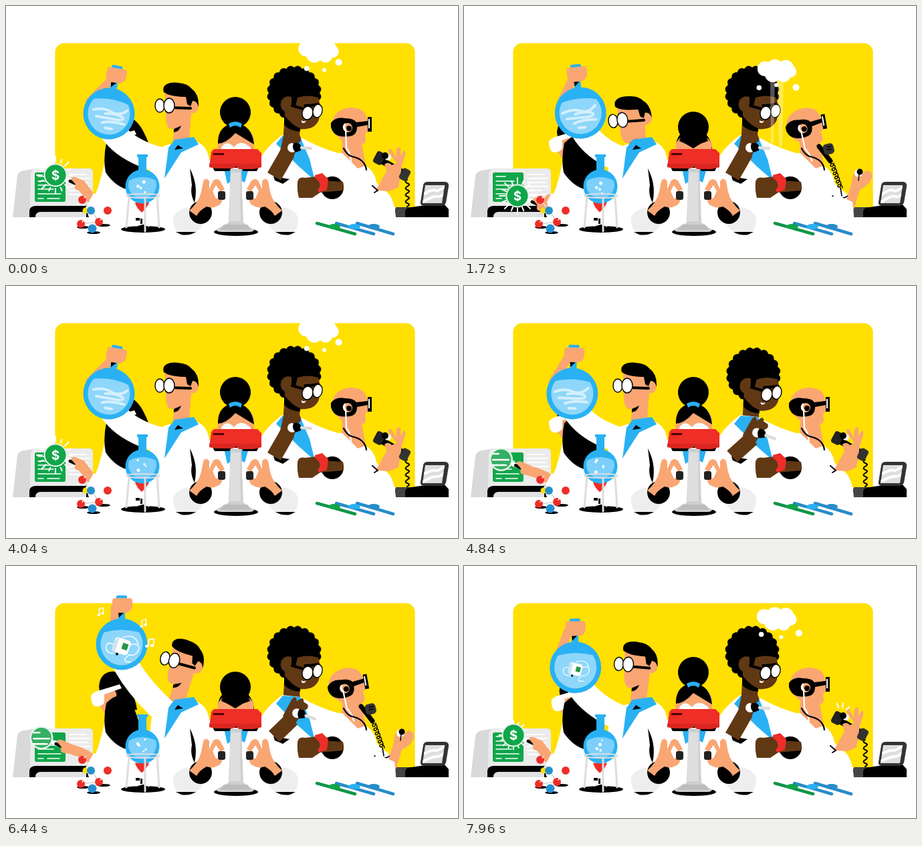
Recreate the animation shown at these times as an HTML page. Size 676 by 377 pixels, loop 8 s.

```html
<!DOCTYPE html>
<html lang="en">
<head>
<meta charset="utf-8">
<title>Laboratory</title>
<style>
  html, body { margin: 0; width: 100%; height: 100%; overflow: hidden; background: #fff; }
  svg { display: block; width: 676px; height: 377px; }
  .skin { fill: #f9a673; } .brown { fill: #613814; } .white { fill: #fff; }
  .blue { fill: #29b1f3; } .red { fill: #ee2e27; } .green { fill: #10a64a; }
  .line { fill: none; stroke: #000; stroke-linecap: round; stroke-linejoin: round; }
  .lit { stroke: #fff; } .flesh { stroke: #f9a673; } .dark { stroke: #613814; }
  .flat { stroke-linecap: butt; } .pale { stroke: #d4effd; } .steel { stroke: #ddd; }
  .glasses { fill: #fff; stroke: #000; stroke-width: 1.4; }
  text { font: 700 19px Inter, Arial, sans-serif; fill: #fff; text-anchor: middle; }
</style>
</head>
<body>
<svg viewBox="0 0 676 377">
  <defs>
    <g id="note" class="line lit" stroke-width="1.8">
      <path d="M-3 5V-6L5 -8V3"/>
      <ellipse cx="-5" cy="5" rx="2" ry="1.4" fill="#fff"/>
      <ellipse cx="3" cy="3" rx="2" ry="1.4" fill="#fff"/>
    </g>
    <clipPath id="lensClip"><circle r="16"/></clipPath>
    <clipPath id="screenClip"><path d="M627 268H656L652 295H623Z"/></clipPath>
    <g id="hold">
      <path fill="#eee" d="M250 318Q252 306 272 301L296 322Q292 338 274 340H262Q250 338 250 318Z"/>
      <path d="M254 338H284Q274 344 262 342Z"/>
      <circle cx="291" cy="309" r="17"/>
      <path class="skin" d="M274 306Q288 294 292 278L295 262Q299 255 304 262V274L310 261Q316 256 321 263L327 274L321 278L314 268L309 277L314 288L321 287Q326 290 320 297Q310 304 300 300Q289 306 285 314Z"/>
      <rect class="white" x="326" y="278" width="8" height="11"/>
      <rect x="317" y="277" width="11" height="13" rx="3" fill="#222"/>
    </g>
  </defs>

  <rect x="73.4" y="55.4" width="538.2" height="262" rx="14" fill="#ffe000"/>
  <path fill="#fff" d="M60 301H620V330H60Z"/>
  <path fill="#444" d="M578 316L583 301H612V316Z"/>

  <!-- scanner -->
  <path fill="#d9d9d9" d="M10 316L17 254Q19 247 27 246L46 243H124Q130 243 130 250V316Z"/>
  <path fill="#ebebeb" d="M37 252Q38 243 47 243H124Q130 243 130 250V301H36Z"/>
  <path d="M35 316V306Q36 299 45 299H130V316Z"/>
  <path fill="#e1e1e1" d="M44 316Q44 308 52 308H120V316Z"/>
  <path class="line lit" stroke-width="2" d="M95 252H120M95 258H125M95 264H122M95 270H125M95 276H116M95 282H124"/>
  <rect class="green" x="43" y="249" width="46" height="44" rx="3"/>
  <path class="line lit" stroke-width="1.6" d="M48 255H62M48 262H75M48 268H82M48 274H71M48 281H82M48 288H56M62 288H80"/>

  <!-- colleague at the back -->
  <g id="backHead">
    <path d="M139 180Q141 160 157 158Q170 156 182 176Q194 198 196 215L150 220Q141 200 139 180Z"/>
    <path class="skin" d="M143 186L160 184Q168 190 164 198Q158 200 158 215Q155 224 147 219L137 205Z"/>
    <path class="white" d="M127 194Q130 189 137 187L170 177L173 183L147 192V204Q144 211 133 210Q127 207 127 194Z"/>
  </g>
  <path class="white" d="M130 330V292Q145 256 150 217L195 250L240 330Z"/>
  <path d="M150 205Q175 180 190 210Q202 235 206 276Q170 281 149 249Q145 229 150 205Z"/>

  <!-- flask holder -->
  <g id="manHead">
    <path class="skin" d="M238 131H270L279 143Q288 140 288 150Q288 160 277 161L273 212H249L251 184Q240 186 239 169Z"/>
    <path d="M236 129C232 117 245 113 258 115Q272 116 278 124Q289 132 288 151Q286 142 279 142L276 150L271 147L269 136Q246 136 236 129Z"/>
    <path d="M251 184L262 179Q259 188 251 189Z"/>
    <path class="line" stroke-width="4" d="M249 152L276 153"/>
    <ellipse class="glasses" cx="230" cy="149" rx="7" ry="10"/>
    <ellipse class="glasses" cx="244" cy="149" rx="8" ry="11"/>
  </g>
  <path class="white" d="M205 330L218 225Q235 206 247 207L283 202Q301 208 304 230L306 335Z"/>
  <path id="sleeve" class="line lit flat" stroke-width="38"/>
  <path class="blue" d="M237 258L243 212L252 200L281 196L288 207L262 219Z"/>
  <path d="M252 215L257 208L265 213ZM275 243Q288 268 282 294Q275 282 278 268Z"/>

  <path id="forearm" class="line flesh" stroke-width="13"/>
  <g id="flask">
    <rect class="blue" x="-5" y="-64" width="10" height="32"/>
    <circle class="blue" r="38.5"/>
    <path fill="#8ed6fa" d="M-26 -18Q0 -25 26 -18A31.6 31.6 0 1 1 -26 -18Z"/>
    <g id="swirl" class="line pale" stroke-width="4">
      <path d="M-27 -2Q-12 -8 0 -3T23 -9M-21 7H10Q24 6 16 1Q4 -2 -8 1M-11 15Q0 10 22 12M-5 22H5"/>
    </g>
    <g id="device">
      <path class="line lit" stroke-width="1.5" d="M-8 4C-30 -6 -26 22 -8 16M12 -5C33 -19 31 11 16 10Q4 26 22 20M-2 -13Q15 -25 24 -10"/>
      <rect class="white" x="-13" y="-11" width="26" height="24" rx="5"/>
      <path fill="#cfe4ec" d="M-13 -5L-7 -11V13H-10Q-13 13 -13 9Z"/>
      <rect x="1" y="-5" width="9" height="10" fill="#27964b"/>
      <circle cx="-3" cy="15" r="2"/>
    </g>
    <rect class="blue" x="-8" y="-73" width="16" height="6" rx="2"/>
    <path class="skin" d="M-14 -65Q-14 -69 -9 -69H13Q17 -68 16 -59Q16 -48 5 -47H-12Q-15 -51 -14 -65Z"/>
    <path d="M-5 -47H3L-4 -40Z"/>
  </g>
  <g id="notes"></g>

  <!-- magnifier -->
  <path id="lensArm" class="line flesh" stroke-width="15"/>
  <path class="white" d="M119 302L131 280L146 286L145 316H124Z"/>
  <g id="lens">
    <g id="rays" class="line lit" stroke-width="2"></g>
    <circle r="17.5" fill="#e4f3e7"/>
    <g clip-path="url(#lensClip)">
      <circle r="15" fill="#35b065"/>
      <path id="lensCard" class="line lit" stroke-width="2.5" d="M-12 -8H-3M-12 1H12M-12 9H8"/>
    </g>
    <g id="coin"><circle class="green" r="15.5"/><text y="7">$</text></g>
    <path class="line lit" stroke-width="7" d="M18 7L23 9"/>
    <path class="line" stroke-width="5" d="M22 9L29 12"/>
    <path class="skin" d="M23 5Q26 1 32 4L44 9L47 22L34 23Q26 21 30 14L25 8Z"/>
  </g>

  <!-- molecule -->
  <g>
    <ellipse cx="115" cy="331" rx="9" ry="2"/><ellipse cx="146" cy="328" rx="10" ry="2"/><ellipse cx="131" cy="339" rx="10" ry="2"/>
    <path class="line steel" stroke-width="2" d="M114 290L127 305L139 323L112 326M139 323L129 333"/>
    <circle cx="119" cy="306" r="4.5" fill="#ffe000"/>
    <g class="red"><circle cx="114" cy="290" r="6"/><circle cx="152" cy="306" r="6"/><circle cx="112" cy="326" r="6"/><circle cx="139" cy="323" r="6"/></g>
    <g fill="#2590d0"><circle cx="127" cy="306" r="6"/><circle cx="129" cy="333" r="6.5"/></g>
    <path class="line lit" stroke-width="1.5" d="M117 287L119 285M141 320L143 318M114 323L116 321"/>
  </g>

  <!-- heated flask -->
  <ellipse cx="205" cy="334" rx="33" ry="5"/>
  <path d="M193 331Q202 322 212 331L216 336H190ZM199 316H206V328H199Z"/>
  <path class="white" d="M194 312H210V318H214V331L208 326L194 330Z"/>
  <path d="M194 317H200V321H194ZM201 318H204V326H201Z"/>
  <path id="flame" class="red" d="M193 294H214Q211 302 203 309Q195 302 193 294Z"/>
  <circle class="blue" cx="204" cy="270" r="25.5"/>
  <path class="blue" d="M196 222H212V226H210V250H198V226H196Z"/>
  <path fill="#7bcffa" d="M184 261Q204 251 224 261A21 21 0 1 1 184 261Z"/>
  <g id="bubbles" class="white"></g>
  <g class="line steel" stroke-width="3"><ellipse cx="205" cy="284" rx="25" ry="3" stroke-width="2"/><path d="M184 286L180 331M226 286L229 331M208 287V337"/></g>

  <!-- experimenter -->
  <g id="curlyHead">
    <path id="curls"/>
    <path class="brown" d="M427 136Q418 133 412 141Q408 153 417 158L414 208H440L439 184Q462 186 468 170L471 152L467 137Q452 132 436 137L433 149L427 150Z"/>
    <path d="M416 163Q428 179 440 183V188Q424 187 416 178Z"/>
    <path class="line" stroke-width="4" d="M428 149L445 154M447 149Q458 149 466 147"/>
    <ellipse class="glasses" cx="451" cy="160" rx="8" ry="10" transform="rotate(12 451 160)"/>
    <ellipse class="glasses" cx="466" cy="157" rx="7" ry="10" transform="rotate(12 466 157)"/>
    <path class="white" d="M442 171Q446 174 449 171Q447 177 442 174Z"/>
  </g>
  <path id="beams" fill="#fff" d="M458 110H465L463 205H459ZM469 110H478L476 210H471Z"/>
  <path class="white" d="M378 340L380 229Q388 212 413 193L440 196Q470 213 500 221V340Z"/>
  <path class="blue" d="M404 206L414 194L440 196L454 229L462 261L438 240Z"/>
  <path d="M400 255L424 259L414 266L402 261Z"/>
  <path id="pipetteArm" class="line dark flat" stroke-width="23"/>
  <g id="pipette">
    <path class="brown" d="M-22 9L-16 -18Q-12 -27 -8 -17L-5 -21Q0 -27 2 -19L9 -17Q13 -11 6 -7L-1 15L-18 22Z"/>
    <circle class="white" cx="-3" r="7"/><path d="M-1 -7H6Q12 -4 10 4L2 7Q-4 1 -1 -7Z"/>
    <path class="line steel" stroke-width="4.5" d="M11 0L25 1"/>
  </g>
  <path id="drop" class="blue" d="M0 -5Q6 4 0 5Q-6 4 0 -5Z"/>
  <g id="cloud" class="white">
    <circle cx="-18" cy="-3" r="11"/><circle cx="-3" cy="-5" r="12"/><circle cx="13" cy="-4" r="12"/><circle cx="20" cy="1" r="9"/><circle cx="-6" cy="5" r="12"/><circle cx="10" cy="7" r="10"/>
  </g>
  <g id="puffs" class="white"><circle r="3.8"/><circle r="3"/><circle r="5"/></g>

  <!-- microscope user -->
  <path class="white" d="M304 230H384V325H304Z"/>
  <g id="faceUp">
    <path class="skin" d="M317 197Q321 183 343 181Q367 183 371 198V219H316Z"/>
    <path d="M317 202Q318 178 343 175Q368 178 371 207L343 190Q330 205 317 206Z"/>
    <path class="white" d="M322 212Q329 199 341 211Q351 198 366 212V218H322Z"/>
  </g>
  <g id="faceDown">
    <path class="skin" d="M317 219V206Q322 193 343 192Q365 193 370 206V219Z"/>
    <path d="M322 202Q326 188 343 187Q360 188 365 202L354 206L343 213L331 206Z"/>
  </g>
  <circle id="bun" cx="343" cy="159" r="23"/>
  <path id="band" class="blue" d="M333 176Q343 170 353 176L351 182Q343 176 335 182Z"/>
  <path class="blue" d="M326 243H363L357 264L344 258L331 266Z"/>
  <ellipse cx="344" cy="338" rx="33" ry="6"/>
  <path fill="#cfcfcf" d="M336 243H352L355 324L371 335Q370 338 364 338H324Q314 338 315 334L333 324Z"/>
  <path fill="#dedede" d="M336 249H350L351 322H334Z"/>
  <path fill="#bdbdbd" d="M326 327H361L366 335H320Z"/>
  <path d="M307 237H380L375 247H355L352 242H337L334 247H312Z"/>
  <path class="red" d="M307 218L311 214H376L382 220V241L370 244H349L344 240L338 243H316L304 241Z"/>
  <path fill="#d92620" d="M304 236H382V241L370 244H349L344 240L338 243H316L304 241Z"/>
  <path fill="#500" d="M310 220H326V223H310Z"/>
  <use href="#hold"/><use href="#hold" transform="matrix(-1 0 0 1 687 0)"/>

  <!-- caller -->
  <path class="skin" d="M503 196L529 188L538 240L525 248L502 222Z"/>
  <g id="callerHead">
    <path class="skin" d="M487 177Q490 154 515 152Q538 152 540 170L543 187L537 191L538 202Q535 211 516 206L503 202L491 191Z"/>
    <path d="M486 175Q493 165 507 168Q520 168 524 174L541 172V166H547V188H541V178L525 181Q525 194 513 195Q490 198 486 181Z"/>
    <circle class="skin" cx="511" cy="182" r="7"/><circle cx="513" cy="183" r="4"/>
    <path class="line lit" stroke-width="3" d="M507 177Q503 181 508 186"/>
    <path class="line lit" stroke-width="2.2" d="M508 185L509 212Q515 220 516 232"/>
    <rect class="white" x="542" y="169" width="2" height="14"/>
  </g>
  <path class="white" d="M490 340V220L503 220L526 243L538 239Q552 248 554 264L564 275Q580 281 583 316V340Z"/>
  <path class="line" stroke-width="2.2" d="M505 213Q510 223 517 225Q537 229 539 245"/>
  <g id="lowPhone">
    <path class="line" stroke-width="2" d="M600 260q-5 3 0 5q6 2 0 5q-5 3 0 5q6 2 0 5q-5 3 0 5q6 2 0 5q-5 3 0 5q6 2 0 5"/>
    <path class="line" stroke-width="10" d="M558 229L596 251"/>
    <path class="skin" d="M553 276L569 247L566 237Q572 232 577 238L584 235L573 220Q570 213 576 214L583 227L584 214Q588 208 590 214V225L594 217Q599 215 597 223L592 239Q590 255 587 271L574 277Z"/>
    <rect x="551" y="218" width="14" height="19" rx="4" fill="#222" transform="rotate(28 558 228)"/>
    <rect x="590" y="243" width="13" height="18" rx="4" fill="#333" transform="rotate(28 596 252)"/>
    <circle class="white" cx="571" cy="226" r="5"/><circle cx="567" cy="224" r="5"/>
    <path class="line" stroke-width="2" d="M548 269L556 276L551 279"/>
    <path id="sparks" class="line lit" stroke-width="2" d="M560 212L558 206M566 212L567 205M572 215L576 211"/>
  </g>
  <g id="highPhone">
    <path class="line" stroke-width="7" d="M531 210L548 232"/>
    <rect x="537" y="206" width="16" height="16" rx="5" fill="#333" transform="rotate(-15 545 213)"/>
    <path class="line" stroke="#777" stroke-width="1.5" d="M543 211L549 210M543 215L549 214"/>
    <path id="coil" class="line" stroke-width="1.4"/>
    <path class="line" stroke-width="1.6" d="M563 272L565 284M551 284Q565 291 574 284"/>
    <path class="skin" d="M569 300L580 264Q581 247 589 246Q594 244 596 250L603 246Q611 248 610 256Q608 267 592 275L583 304Z"/>
    <path class="white" d="M553 281L581 293Q583 306 583 320H550Z"/>
    <circle class="white" cx="590" cy="250" r="6"/><circle cx="592" cy="248" r="4.5"/><path class="line" stroke-width="1.5" d="M591 251L590 261"/>
  </g>
  <circle cx="488" cy="272" r="17"/>
  <path class="brown" d="M436 263Q438 255 447 257L465 255L470 261L504 263Q506 270 504 276L470 279L458 287H438Q435 276 436 263Z"/>
  <path class="red" d="M462 253L473 250L482 259L480 275L468 279L466 275Q475 267 462 257Z"/>

  <!-- desk phone -->
  <path d="M597 316V307Q598 301 607 301L620 299L655 296L662 304V316Z"/>
  <path fill="#333" d="M624 268Q625 263 631 263H657Q663 264 662 270L658 294Q656 299 651 299H624Q619 298 620 293Z"/>
  <path fill="#dedede" d="M627 268H656L652 295H623Z"/>
  <path id="shine" class="line lit" clip-path="url(#screenClip)" stroke-width="4"/>

  <!-- sample tubes -->
  <g class="line" stroke-width="4.5">
    <path stroke="#0d9547" style="stroke:#0d9547" d="M465 325L522 341"/><path style="stroke:#278bcb" d="M494 325L550 341M525 325L579 341"/>
  </g>
  <ellipse class="green" cx="491" cy="330" rx="9" ry="4"/><ellipse class="blue" cx="521" cy="330" rx="9" ry="4"/><ellipse fill="#278bcb" cx="550" cy="330" rx="9" ry="4"/>
</svg>
<script>
const LOOP = 8000, CYCLE = 4040, HALF = CYCLE / 2, TAU = Math.PI * 2;
const $ = id => document.getElementById(id);
const set = (el, name, value) => el.setAttribute(name, value);
const place = (el, x, y, turn = 0, size = 1) =>
  set(el, 'transform', `translate(${x} ${y}) rotate(${turn}) scale(${size})`);
const pivot = (el, x, y, turn, px, py) =>
  set(el, 'transform', `translate(${x} ${y}) rotate(${turn} ${px} ${py})`);
const fade = (el, a) => set(el, 'opacity', +a);
const wrap = (t, length) => (t % length + length) % length;

// Smooth 0 to 1 between two times, and a rise followed by a fall.
function ease(t, from, to) {
  const u = Math.min(1, Math.max(0, (t - from) / (to - from)));
  return u * u * (3 - 2 * u);
}
const pulse = (t, rise, full, fall, end) => ease(t, rise, full) - ease(t, fall, end);

function addSvg(parent, tag, attrs) {
  const el = document.createElementNS('http://www.w3.org/2000/svg', tag);
  for (const name in attrs) set(el, name, attrs[name]);
  return parent.appendChild(el);
}
const repeat = (n, make) => Array.from({ length: n }, (_, i) => make(i));
const curve = (n, f) => 'M' + repeat(n, i => f(i / (n - 1)).map(v => v.toFixed(1)).join(' ')).join('L');

set($('curls'), 'd', curve(181, u => {
  const a = u * TAU, r = 38 + 2.8 * Math.abs(Math.sin(a * 10));
  return [431 + r * Math.cos(a), 130 + r * Math.sin(a)];
}));
set($('coil'), 'd', curve(90, u =>
  [550 + 13 * u + 3 * Math.cos(u * 6 * TAU), 235 + 37 * u + 3.5 * Math.sin(u * 6 * TAU)]));
const bubbles = repeat(5, i => addSvg($('bubbles'), 'circle', { r: 1.3 + i * 7 % 5 * .3 }));
const rays = repeat(16, i => addSvg($('rays'), 'path', { transform: `rotate(${i * 22.5})` }));
const notes = repeat(4, () => addSvg($('notes'), 'use', { href: '#note' }));

function drawFlask(p) {
  const up = pulse(p, 1700, 1930, 3640, 4040);
  const settle = pulse(p, 1520, 1720, 1720, 1930);
  const shake = 1 - pulse(p, 1500, 1720, 3640, 4040);
  const swing = shake * Math.cos(p / CYCLE * 9 * TAU);
  const x = 164 + 9 * up + 10 * settle - 10 * swing, y = 161 - 44 * up;
  place($('flask'), x, y, 10 * swing - 6 * settle);
  set($('forearm'), 'd', `M${x - 10 + 17 * swing * (1 - up)} ${y - 54}L${x - 28 + 17 * up} ${y - 18}`);
  set($('sleeve'), 'd', `M258 236Q${x + 14} ${y + 60} ${x - 4} ${y + 8}`);

  const found = pulse(p, 1760, 1930, 3930, 4020);
  fade($('device'), found);
  fade($('swirl'), 1 - found);
  place($('device'), 0, 2, 12 + 6 * Math.sin(p / 300), .7 + .25 * up);
  place($('swirl'), 3 * swing, 0);

  const nod = pulse(p, 1250, 1720, 1740, 1900);
  pivot($('manHead'), -3 * nod - up, 19 * nod - 4 * up, 13 * up - 7 * nod, 264, 185);
  place($('backHead'), 22 * (1 - pulse(p, 250, 600, 3880, 4040)), 9 * (1 - up));

  notes.forEach((el, i) => {
    const left = i === 3, u = (p - 1876 - i % 3 * 374) / 935;
    const size = u > 0 && u < 1 ? Math.min(1, u * 8, (1 - u) * 8) * (1 - .4 * u) : 0;
    place(el, left ? 156 - 25 * u : 220 - 25 * u, (left ? 111 : 128) - 75 * u, 8 * Math.sin(u * 8), size);
  });
}

function drawLens(p) {
  const high = 1 - pulse(p, 180, 620, 3350, 3800);
  const low = pulse(p, 600, 1680, 1960, 2320);
  const x = 53 + 21 * high + 27 * low, y = 257 - 4 * high + 27 * low;
  place($('lens'), x, y);
  set($('lensArm'), 'd', `M${x + 39} ${y + 16}Q118 ${y + 22} 128 289`);
  place($('lensCard'), (54 - x) / 3, (258 - y) / 4);
  place($('coin'), 0, 0, 0, 1 - pulse(p, 180, 300, 3740, 3860) + pulse(p, 1480, 1680, 2000, 2140));

  const age = Math.min(wrap(p - 1600, CYCLE), wrap(p - 3860, CYCLE));
  const inner = 18 + 10 * ease(age, 80, 420), outer = 18 + 10 * ease(age, 0, 150);
  fade($('rays'), age < 400);
  rays.forEach((el, i) => set(el, 'd', `M0 ${-inner}V${-outer + i % 2 * (outer - inner) / 3}`));
}

function drawExperiment(q) {
  const lean = pulse(q, 700, 950, 1180, 1400), lower = pulse(q, 120, 380, 1150, 1400);
  const x = 431 + 7 * lower + 8 * lean, y = 212 + 9 * lower - 2 * lean;
  place($('curlyHead'), 5 * lean, 7 * lean);
  place($('pipette'), x, y, 16 * lower + 2 * lean);
  set($('pipetteArm'), 'd', `M401 255L${x - 10} ${y + 8}`);
  const fall = Math.max(0, q - 1080);
  place($('drop'), 467, 229 + .0016 * fall * fall, 0, q < 1260 ? ease(q, 940, 1080) : 0);

  const age = wrap(q - 1240, HALF), grow = age < 1080 ? ease(age, 0, 230) : 0, top = 145 - age * .1;
  place($('cloud'), 469 - age * .002, top, 0, grow * (.95 + age * .00012));
  fade($('beams'), .5 * pulse(age, 0, 150, 400, 600));
  [...$('puffs').children].forEach((el, i) => place(el, 446 + 25 * i + 5 * Math.sin(age / 110 + i),
    top + 28 - 4 * i + 5 * Math.sin(age / 130 + 2 * i), 0, grow));
}

function drawOthers(p, t) {
  const bow = pulse(p, 1000, 1300, 3000, 3350);
  place($('bun'), 0, 22 * bow);
  place($('band'), 0, 14 * bow);
  place($('faceUp'), 0, 8 * bow);
  fade($('band'), bow < .95);
  fade($('faceDown'), bow > .5);

  const call = pulse(p, 1060, 1260, 2680, 2880), lifted = call > .5;
  pivot($('callerHead'), -3 * call, call, -10 * call, 513, 190);
  fade($('lowPhone'), !lifted);
  fade($('highPhone'), lifted);
  place($('lowPhone'), -10 * call, -10 * call);
  place($('highPhone'), 10 * (1 - call), 10 * (1 - call));
  fade($('sparks'), p > 3000 && wrap(p - 3040, 800) < 200);

  const w = 1.5 * Math.sin(t / 130);
  set($('shine'), 'd', `M618 ${285 + w}Q638 ${273 - w} 642 276T664 ${264 + w}M622 ${294 + w}Q640 ${283 - w} 645 285T664 ${273 + w}`);
  place($('flame'), 0, Math.sin(t / 60));
  bubbles.forEach((el, i) => {
    const u = (t / 900 + i * .37) % 1;
    place(el, 203 + 6 * Math.sin(i * 2.3 + u * 3), 281 - 24 * u, 0, Math.min(1, 6 * (1 - u)));
  });
}

function frame(now) {
  const t = wrap(now - start, LOOP), p = t % CYCLE;
  drawFlask(p);
  drawLens(p);
  drawExperiment(p % HALF);
  drawOthers(p, t);
  requestAnimationFrame(frame);
}
const start = performance.now();
frame(start);
</script>
</body>
</html>
```
